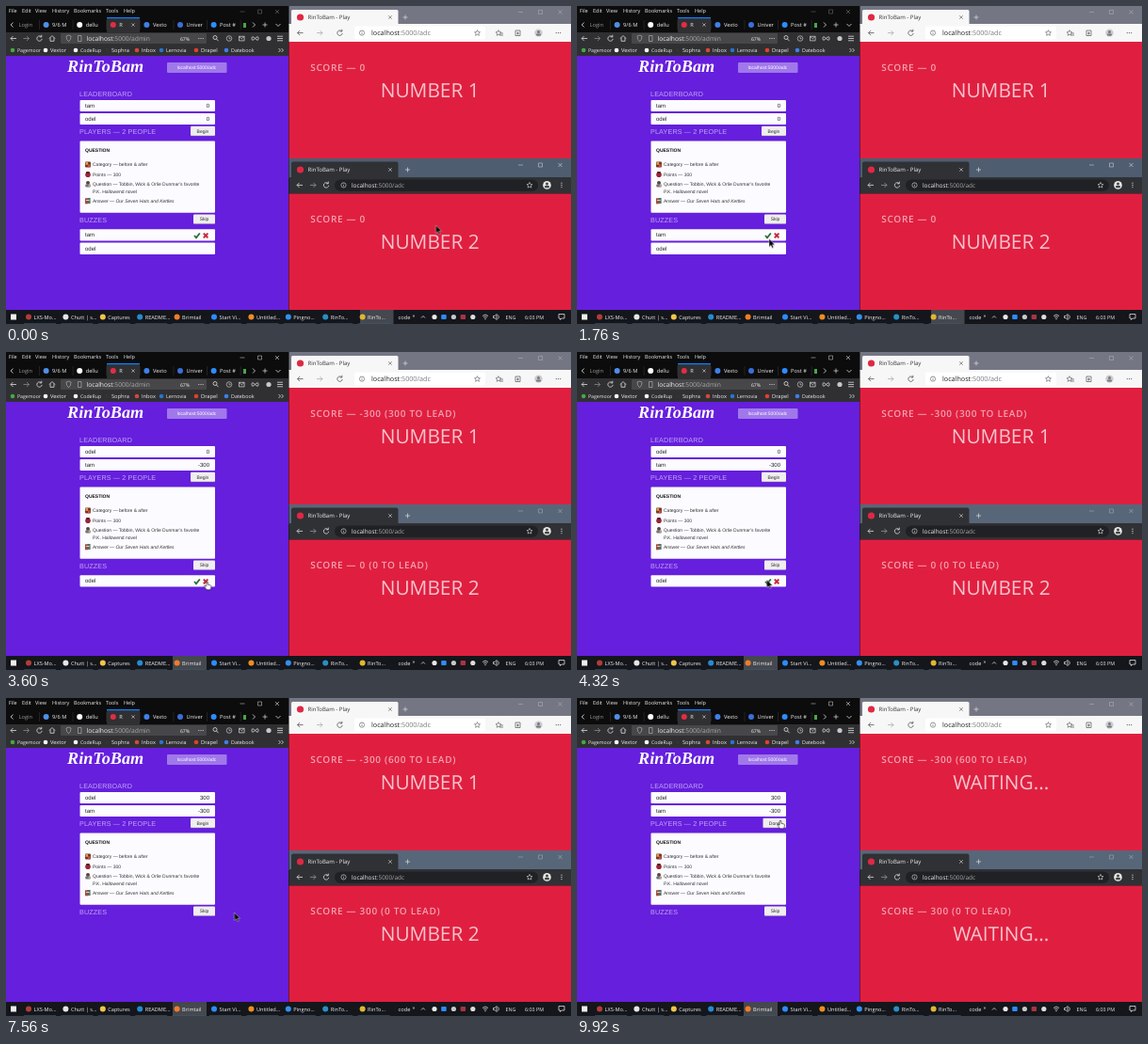
Write an HTML page that moves like this. It is 600x338 px and loops after 10 s.

```html
<!DOCTYPE html>
<html lang="en">
<head>
<meta charset="utf-8">
<title>Quiz desktop</title>
<style>
html, body { margin: 0; width: 100%; height: 100%; overflow: hidden; background: #0c0c0e; }
svg { display: block; width: 100%; height: 100%; }
text { font-family: "Open Sans", "Noto Sans", sans-serif; text-rendering: geometricPrecision; white-space: pre; }
.page, .page text { font-family: "Liberation Sans", Arial, sans-serif; }
.ui { font-size: 5.7px; fill: #eee; }
.heading { font-size: 7.2px; letter-spacing: .15px; fill: #c3a5f3; }
.row { font-size: 6px; fill: #222; }
.note { font-size: 5px; fill: #333; }
.logo { font: italic bold 18.2px "Liberation Serif", "Times New Roman", serif !important; fill: #fff; }
.score { font-size: 10px; font-weight: 600; letter-spacing: .7px; fill: #f3a3b1; }
.number { font-size: 20.8px; fill: #f7c3cc; }
.mid { text-anchor: middle; }
.end { text-anchor: end; }
.line { fill: none; stroke: currentColor; stroke-width: .8; }

/* One percent of the loop is 100 ms. */
.phase, .cursor { animation: 10s infinite; }
.phase { animation-timing-function: step-end; }
.cursor { animation-name: travel; animation-timing-function: linear; }
.open { animation-name: open; }
.wrong { animation-name: wrong; }
.right { animation-name: right; }
.playing { animation-name: playing; }
.waiting { animation-name: waiting; }
.unfocused { animation-name: unfocused; }
.focused { animation-name: focused; }
.arrow { animation-name: arrow; }
.hand { animation-name: hand; }
@keyframes open { 0% { visibility: visible } 30%, to { visibility: hidden } }
@keyframes wrong { 0% { visibility: hidden } 30% { visibility: visible } 45.2%, to { visibility: hidden } }
@keyframes right { 0% { visibility: hidden } 45.2%, to { visibility: visible } }
@keyframes playing { 0% { visibility: visible } 99.2%, to { visibility: hidden } }
@keyframes waiting { 0% { visibility: hidden } 99.2%, to { visibility: visible } }
@keyframes unfocused { 0% { visibility: visible } 27.2%, to { visibility: hidden } }
@keyframes focused { 0% { visibility: hidden } 27.2%, to { visibility: visible } }
@keyframes arrow {
  0% { visibility: visible } 21.2% { visibility: hidden }
  43.2% { visibility: visible } 94%, to { visibility: hidden }
}
@keyframes hand {
  0% { visibility: hidden } 21.2% { visibility: visible }
  43.2% { visibility: hidden } 94%, to { visibility: visible }
}
@keyframes travel {
  0%, 3.2% { transform: translate(456.5px, 233px); animation-timing-function: ease-in-out }
  12.4%, 13.6% { transform: translate(212px, 253px) }
  17.6%, 18.8% { transform: translate(204px, 247.5px) }
  21.6%, 23.6% { transform: translate(211px, 245px) }
  24%, 38% { transform: translate(213.5px, 244px) }
  39.2%, 42% { transform: translate(204px, 244px) }
  43.2%, 68% { transform: translate(201.5px, 242px) }
  70%, 71.6% { transform: translate(236px, 232px) }
  72.4%, 74.8% { transform: translate(241px, 229px) }
  75.6%, 88.4% { transform: translate(242.5px, 228px) }
  89.2%, 90.8% { transform: translate(241px, 200px) }
  94.8%, to { transform: translate(216px, 130px) }
}
</style>
</head>
<body>
<svg id="stage" viewBox="0 0 600 338" preserveAspectRatio="none"></svg>
<script>
const TITLE = 'RinToBam', FIRST = 'tam', SECOND = 'odel';

const rect = (x, y, w, h, fill, r = 0) =>
  `<rect x="${x}" y="${y}" width="${w}" height="${h}" fill="${fill}" rx="${r}"/>`;
const dot = (x, y, r, fill) => `<circle cx="${x}" cy="${y}" r="${r}" fill="${fill}"/>`;
const text = (x, y, body, cls = 'ui', style = '') =>
  `<text x="${x}" y="${y}" class="${cls}" style="${style}">${body}</text>`;
const line = (d, color = '#ddd', width = .8) =>
  `<path class="line" d="${d}" style="color:${color};stroke-width:${width}"/>`;
const phase = (name, body) => `<g class="phase ${name}">${body}</g>`;
const at = (x, y, body) => `<g transform="translate(${x} ${y})">${body}</g>`;

const back = (x, y, c) => line(`M${x + 3} ${y}h-6m2.5-2.5l-2.5 2.5 2.5 2.5`, c);
const forward = (x, y, c) => line(`M${x - 3} ${y}h6m-2.5-2.5l2.5 2.5-2.5 2.5`, c);
const reload = (x, y, c) => line(`M${x + 2} ${y - 1.8}a2.7 2.7 0 1 0 .7 2.2m-.4-4.2v2.2h-2.2`, c);
const home = (x, y, c) => line(`M${x - 3} ${y}l3-3 3 3m-5-1v3.8h4v-3.8`, c);
const star = (x, y, c) =>
  line(`M${x} ${y - 3}l.9 2 2.1.2-1.6 1.4.5 2.1-1.9-1.1-1.9 1.1.5-2.1-1.6-1.4 2.1-.2z`, c, .6);
const ring = (x, y, r, inner, c) => line(`M${x - r} ${y}a${r} ${r} 0 1 0 ${2 * r} 0a${r} ${r} 0 1 0-${2 * r} 0${inner}`, c, .6);
const info = (x, y, c) => ring(x, y, 2.6, 'm2.6-.4v1.8m0-3.2v.6', c);
const plus = (x, y, c) => line(`M${x - 2.5} ${y}h5m-2.5-2.5v5`, c, .7);
const cross = (x, y, c, s = 2) => line(`M${x - s} ${y - s}l${2 * s} ${2 * s}m0-${2 * s}l-${2 * s} ${2 * s}`, c, .6);
const dots = (x, y, dx, dy, c) => [-1, 0, 1].map(i => dot(x + i * dx, y + i * dy, .6, c)).join('');
const controls = (x, y, gap, c) =>
  line(`M${x - 2.5} ${y}h5M${x + gap - 2} ${y - 2}h4v4h-4z`, c, .5) + cross(x + 2 * gap, y, c);

function adminChrome() {
  const menu = [[3, 'File'], [17, 'Edit'], [31, 'View'], [49, 'History'], [72, 'Bookmarks'], [106, 'Tools'], [125, 'Help']];
  const tabs = [['Login'], ['9/6 M', '#4f8fe8'], ['dellu', '#fff'], ['R', '#e22d45'],
    ['Vexto', '#3f80e8'], ['Univer', '#3a6fd8'], ['Post #', '#2d8cff']];
  const links = [[12, 'Pagemoor', '#4aa548', 5.2], [47, 'Vextor', '#fff'], [79, 'CodeRup', '#fff', 5.2], [112, 'Sophra', '#333'],
    [144, 'Inbox', '#d5473c'], [170, 'Lernovia', '#2a73cc', 5.4], [207, 'Drapel', '#e0402f'], [239, 'Datebook', '#3f7fe8', 5.4]];
  return rect(0, 0, 300, 28, '#0c0c0d') + rect(0, 28, 300, 25, '#303033')
    + menu.map(([x, s]) => text(x, 7, s, 'ui', 'font-size:5.5px')).join('')
    + phase('unfocused', controls(251, 6, 18.5, '#777')) + phase('focused', controls(251, 6, 18.5, '#ddd'))
    + rect(107, 12, 35, 16, '#303033') + rect(107, 12, 35, 1.2, '#0a84ff')
    + line('M7.5 17.5l-2.5 2.5 2.5 2.5')
    + tabs.map(([label, color], i) => {
      const x = i * 35.6;
      return (color ? dot(x + 7, 20, 3, color) : '')
        + text(x + 13.5, 22, label, 'ui', color ? '' : 'fill:#999')
        + line(`M${x + 35.5} 15v10`, '#444', .4);
    }).join('')
    + cross(135, 20, '#ddd', 1.6) + rect(252, 18, 3, 5, '#4aa548')
    + line('M262 17.5l2.5 2.5-2.5 2.5') + plus(275, 20, '#ddd') + line('M286.5 19l2.5 2.5 2.5-2.5')
    + back(8, 34.5, '#ddd') + forward(21.5, 34.5, '#888') + reload(35.5, 34.5, '#ddd') + home(49, 34.5, '#ddd')
    + rect(58, 29, 155, 11, '#474749', 1)
    + line('M64 32l2.5-.9 2.5.9q0 4.2-2.5 5.7-2.5-1.5-2.5-5.7zM76.5 31.5h3.5v6h-3.5z', '#bbb', .6)
    + text(85.5, 37, 'localhost<tspan fill="#aaa">:5000/admin</tspan>', 'ui', 'font-size:6.7px')
    + text(190, 36.5, '67%', 'ui mid', 'font-size:5.2px') + dots(207, 34.5, 2.2, 0, '#ddd')
    + line('M220 33.5a2 2 0 1 0 4 0a2 2 0 1 0-4 0m3.5 1.5l2 2.2')
    + ring(237, 34.5, 2.8, 'm2.8-1.6v1.8h1.6', '#ddd') + line('M247.5 32.3h5.6v4.6h-5.6zl2.8 2.6 2.8-2.6', '#ddd', .7)
    + line('M264.5 34.5q-3.5-3.6-3.5 0t3.5 0q3.5-3.6 3.5 0t-3.5 0') + dot(279, 34.5, 2.6, '#c7c7cc')
    + line('M288 32.2h6m-6 2.3h6m-6 2.3h6')
    + links.map(([x, s, c, size = 5.7]) => dot(x - 5, 47, 2.3, c) + text(x, 49.2, s, 'ui', `font-size:${size}px`)).join('')
    + line('M289.5 45l2 2-2 2m3-4l2 2-2 2');
}

const panel = (y, h = 12) => rect(78.5, y, 143.5, h, '#fcfbff', 1);
const board = entries => entries.map(([name, points], i) =>
  text(84, 108.3 + i * 13.6, name, 'row') + text(216, 108.3 + i * 13.6, points, 'row end')).join('');
const buzzes = names => names.map((name, i) =>
  panel(237.2 + i * 14.4, 12.4) + text(84, 245.4 + i * 14.4, name, 'row')).join('')
  + line('M200 244l2 2.3 3.8-4.8', '#2b6e34', 1.8)
  + line('M209.8 241.6l4.6 4.8m0-4.8l-4.6 4.8', '#c32433', 1.9);
const button = (x, y, w, label) => rect(x, y, w, 10.2, '#f0eeee', 1)
  + line(`M${x} ${y + 10}h${w}`, '#a99cae', .5) + text(x + w / 2, y + 6.8, label, 'note mid');

function adminPage() {
  const icons = at(84, 165.5, rect(0, 0, 6, 6, '#6d3c35', 1) + rect(.5, .3, 2.5, 3, '#e1a044') + rect(3, 2.7, 2.5, 3, '#d94839'))
    + at(84, 176, dot(3, 3.3, 2.8, '#9b2435') + rect(1.2, 0, 3.5, 2, '#5b1e2e'))
    + at(84, 186, dot(3, 2, 2, '#554842') + rect(.3, 3.6, 5.5, 2.8, '#6f7780', 1) + dot(4.7, 4.7, 1.2, '#cfa57c'))
    + at(84, 204, rect(0, .3, 3, 6, '#a74a3b') + rect(2.4, 0, 3.2, 6, '#56706b') + rect(1, 2, 3.6, 1, '#e9d2a6'));
  return `<g class="page">${rect(0, 53, 300, 271, '#651fdd')}`
    + text(65, 69.7, TITLE, 'logo')
    + rect(171, 60, 63.5, 11, '#a078ea', 1) + text(202.5, 67.2, 'localhost:5000/adc', 'note mid', 'fill:#fff')
    + text(78, 96.4, 'LEADERBOARD', 'heading') + panel(100) + panel(114)
    + text(78, 136, 'PLAYERS — 2 PEOPLE', 'heading')
    + phase('playing', button(196, 127.8, 26, 'Begin'))
    + phase('waiting', button(197.5, 127.8, 24.5, 'Done'))
    + panel(143.5, 76.2) + icons
    + text(84, 155, 'QUESTION', 'note', 'font-weight:bold;fill:#111')
    + text(92, 170.3, 'Category — before &amp; after', 'note')
    + text(92, 180.8, 'Points — 300', 'note')
    + text(92, 191, 'Question — Tobbin, Wick &amp; Orlie Dunmar’s favorite', 'note')
    + text(92, 198.8, 'P.K. Hallowend novel', 'note')
    + text(92, 209, 'Answer — <tspan font-style="italic">Our Seven Hats and Kettles</tspan>', 'note')
    + text(78, 229.5, 'BUZZES', 'heading') + button(199, 221.4, 23, 'Skip')
    + phase('open', board([[FIRST, '0'], [SECOND, '0']]) + buzzes([FIRST, SECOND]))
    + phase('wrong', board([[SECOND, '0'], [FIRST, '-300']]) + buzzes([SECOND]))
    + phase('right', board([[SECOND, '300'], [FIRST, '-300']]))
    + '</g>';
}

// Everything below a player's browser toolbar.
const playerBody = (y, number, scores) => rect(300.5, y, 299.5, 124.5, '#e01f40')
  + ['open', 'wrong', 'right'].map((name, i) => phase(name, text(323.3, y + 30.8, `SCORE — ${scores[i]}`, 'score'))).join('')
  + phase('playing', text(450.2, y + 58.9, `NUMBER ${number}`, 'number mid'))
  + phase('waiting', text(450.2, y + 58.9, 'WAITING...', 'number mid'));

function lightPlayer() {
  const ink = '#555';
  return rect(300.5, 0, 299.5, 20, '#747684') + rect(303, 4, 113.5, 16, '#f7f7f7', 1.5) + rect(300.5, 19, 299.5, 19, '#f7f7f7')
    + dot(312.5, 12, 3.6, '#df2844') + text(320.5, 14.2, `${TITLE} - Play`, 'ui', 'fill:#333;font-size:6px')
    + cross(408, 12, ink, 1.8) + plus(424, 12, '#ddd') + controls(546.5, 6.5, 21, '#b5b6be')
    + back(312.5, 28.6, ink) + forward(333, 28.6, '#aaa') + reload(354.5, 28.6, ink)
    + rect(370, 21.5, 139, 14, '#fff', 2) + info(378, 28.6, ink)
    + text(388, 31.4, 'localhost<tspan fill="#777">:5000/adc</tspan>', 'ui', 'fill:#222;font-size:7.2px')
    + star(500.5, 28.6, ink) + star(523, 28.6, ink) + line('M525 31h3m-3-2h3M541 26h5v5.5h-5zM543.5 27.5v3m-1.5-1.5h3', ink, .7)
    + dot(565.5, 28.6, 4.2, '#c9ccd2') + dot(565.5, 27.4, 1.5, '#777') + rect(563, 29.4, 5, 2.2, '#777', 1)
    + dots(586.5, 28.6, 2.2, 0, ink)
    + playerBody(38, 1, ['0', '-300 (300 TO LEAD)', '-300 (600 TO LEAD)']);
}

function darkPlayer() {
  const ink = '#ddd';
  const titleBar = (fill, c) => rect(300.5, 162, 299.5, 21, fill) + controls(546.5, 169, 21, c);
  return phase('unfocused', titleBar('#4e5d70', ink)) + phase('focused', titleBar('#586679', '#a9b0ba'))
    + rect(303, 165.5, 113.5, 18, '#303135', 2) + rect(300.5, 182, 299.5, 17.5, '#303135')
    + dot(312.5, 174, 3.6, '#df2844') + text(320.5, 176.2, `${TITLE} - Play`, 'ui', 'font-size:6px')
    + cross(408, 174, ink, 1.8) + plus(426.5, 174, ink)
    + back(312, 190.4, ink) + forward(326, 190.4, '#999') + reload(340, 190.4, ink)
    + rect(349, 184.5, 216, 12.3, '#202124', 6) + info(358.5, 190.4, ink)
    + text(367, 192.7, 'localhost<tspan fill="#aaa">:5000/adc</tspan>', 'ui', 'font-size:6.4px')
    + star(556, 190.4, ink)
    + dot(574.5, 190.4, 4.3, '#e8e8e8') + dot(574.5, 189.1, 1.5, '#444') + rect(572, 191.1, 5, 2.2, '#444', 1)
    + dots(590, 190.4, 0, 2.2, ink)
    + playerBody(199.5, 2, ['0', '0 (0 TO LEAD)', '300 (0 TO LEAD)']);
}

function taskbar() {
  const tasks = [['LXS-Mo...', '#b33c37'], ['Chutt | s...', '#e6e6e6'], ['Captures', '#f2c44c'], ['README...', '#268bd2'], ['Brimtail', '#f17c2a'],
    ['Start Vi...', '#2d8cff'], ['Untitled...', '#ef8c23'], ['Pingno...', '#3290f2'], ['RinTo...', '#2a8fc4'], ['RinTo...', '#e4b62f']];
  const tray = ['#e8e8e8', '#2d8cff', '#c8c8c8', '#a93443', '#ddd'];
  return rect(0, 323, 600, 15, '#14161b')
    + phase('unfocused', rect(376, 323, 35.5, 15, '#45484e'))
    + phase('focused', rect(177, 323, 36, 15, '#45484e'))
    + rect(5, 327.5, 6, 6, '#eee')
    + tasks.map(([label, color], i) => {
      const x = 18 + i * 39.4;
      return dot(x + 6, 330.5, 3, color) + text(x + 11.5, 332.6, label, 'ui', 'font-size:5.6px')
        + rect(x + 1, 337.4, 34, .6, '#3e5a70');
    }).join('')
    + text(416.5, 332.6, 'code') + text(431.5, 331, '»') + line('M441 331.5l2-2 2 2')
    + tray.map((c, i) => i % 2 ? rect(452 + i * 10.2, 328, 5.5, 5, c, 1) : dot(455 + i * 10.2, 330.5, 2.6, c)).join('')
    + line('M506 329.5q3-3 6 0m-4.8 1.5q1.8-1.8 3.6 0') + dot(509, 332.5, .7, '#ddd')
    + line('M517.5 329.5h1.5l2-2v6l-2-2h-1.5zM522.5 328.5q1.8 2 0 4')
    + text(530.5, 332.6, 'ENG', 'ui', 'font-size:5.4px') + text(551, 332.6, '6:03 PM', 'ui', 'font-size:5.4px')
    + line('M587 327.5h6v4.5h-3l-1.5 1.5v-1.5H587z');
}

const pointer = `<g class="cursor">`
  + phase('arrow', '<path d="M0 0v8.5l2-1.8 1.3 3 1.4-.6-1.3-2.9h2.7z" fill="#080808" stroke="#ddd" stroke-width=".45"/>')
  + phase('hand', '<path d="M-.9.8q.9-1.5 1.8 0v2.5l2.7.7q1 .3.8 1.4L3.7 8.8h-4l-2.7-3.6q-.2-1.3 1-.8l1.1.9z" fill="#fff" stroke="#111" stroke-width=".6"/>')
  + '</g>';

document.getElementById('stage').innerHTML =
  adminChrome() + adminPage() + lightPlayer() + darkPlayer() + taskbar() + pointer;
</script>
</body>
</html>
```
